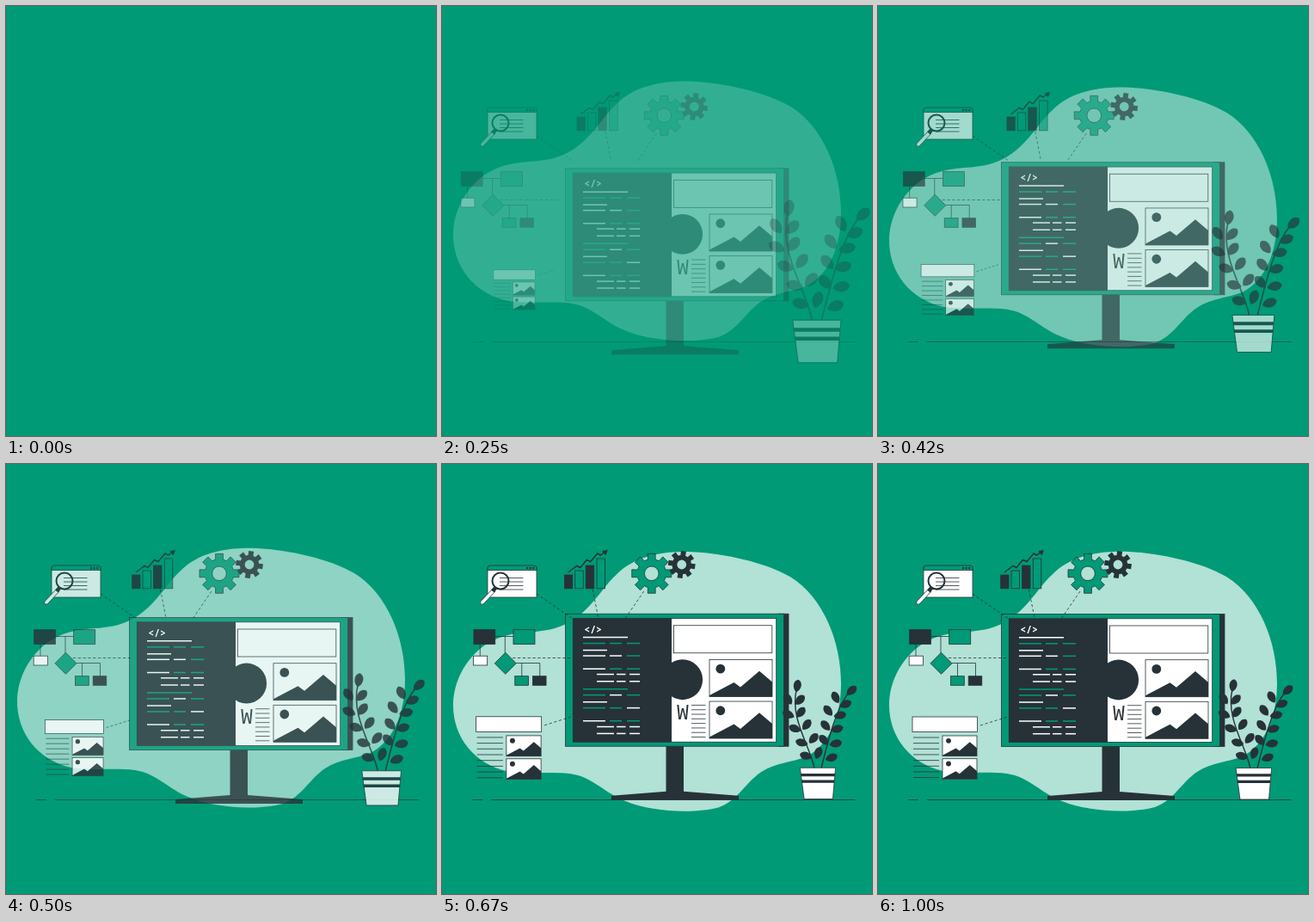
Write an HTML page that moves like this. It is 500x500 px and loops after 1040 ms.

```html
<!DOCTYPE html>
<html lang="en">
<head>
<meta charset="utf-8">
<title>Web development</title>
<style>
  html, body { margin: 0; width: 100%; height: 100%; overflow: hidden; background: #009a76; }
  svg { display: block; width: 100vw; height: 100vh; }
  .main { fill: #009a76; }
  .dark { fill: #263238; }
  .white { fill: #fff; }
  .edge { stroke: #263238; stroke-width: .8; }
  .line { fill: none; stroke: #263238; stroke-width: .8; }
  .dash { fill: none; stroke: #263238; stroke-width: .8; stroke-dasharray: 3.2 2.6; }
  text { font-family: "Noto Sans Mono", "DejaVu Sans Mono", monospace; }
</style>
</head>
<body>
<svg viewBox="0 0 500 500">
  <g id="blob">
    <path fill="#b2e1d6" d="M13 278C14 247 34 214 66 202C96 191 122 200 151 182C178 165 186 141 211 121C236 103 268 101 292 102C329 104 376 114 405 131C444 155 464 207 464 255C464 296 449 327 424 340C406 347 388 347 371 358C353 370 344 391 322 399C293 407 243 404 214 392C188 382 176 364 150 360C124 357 102 361 76 357C38 349 12 317 13 278Z"/>
  </g>

  <g id="ground">
    <path class="line" d="M35.500 390.500H47M57 390.500H480.500"/>
  </g>

  <g id="monitor">
    <path class="dark" d="M260.500 328H281V381L345 386V391H197V386L260.500 381Z"/>
    <rect class="dark edge" x="391" y="174.500" width="12" height="154"/>
    <rect class="main edge" x="143.500" y="174.500" width="254" height="154"/>
    <rect class="white edge" x="152.300" y="179.800" width="236.400" height="143.700"/>
    <rect class="dark" x="152" y="179.500" width="115" height="144.300"/>
    <circle class="dark" cx="279.700" cy="251" r="23.400"/>
    <text class="white" x="165.300" y="197" font-size="11.500" font-weight="600">&lt;/&gt;</text>
    <g id="code" stroke-width="1.500"></g>
    <rect class="white edge" x="269.500" y="188" width="114.300" height="32"/>
    <g id="photos"></g>
    <text class="dark" x="272.800" y="297.500" font-size="24">W</text>
    <path id="column" class="line"/>
  </g>

  <g id="search">
    <rect class="white edge" x="53" y="120" width="57" height="35"/>
    <path class="main edge" d="M53 123.500V121Q53 118 56 118H107Q110 118 110 121V123.500Z"/>
    <g class="dark"><circle cx="99" cy="121" r="1.200"/><circle cx="102.600" cy="121" r="1.200"/><circle cx="106.200" cy="121" r="1.200"/></g>
    <path class="line" d="M67 132.500H94.500M67 137H94.500M67 141.500H94.500M67 146H94.500"/>
    <circle cx="68" cy="136" r="9.500" fill="none" stroke="#263238" stroke-width="2"/>
    <path class="white edge" d="M58.500 145.500L61.800 148.300L48.500 162.500Q46.500 164 45 162.500Q44 161 45.300 159.500Z"/>
    <path class="dark" d="M61 142L64.300 144.700L60.800 149.500L57 146.500Z"/>
    <path class="dash" d="M110 151L152 180"/>
  </g>

  <g id="chart">
    <g class="edge">
      <rect class="dark" x="142.700" y="129" width="9.300" height="15.800"/>
      <rect class="main" x="155" y="124" width="9.500" height="20.800"/>
      <rect class="dark" x="167.500" y="118" width="9.500" height="26.800"/>
      <rect class="main" x="180.300" y="110" width="9.500" height="34.800"/>
    </g>
    <path fill="none" stroke="#263238" stroke-width="1.500" d="M147 126L157 118.500L161 120.500L168.500 111.500L173 113.500L181 104L184.500 106L190 102"/>
    <path class="dark" d="M193 100L190.500 106.500L186.500 101Z"/>
    <path class="dash" d="M175.500 146L182 179"/>
  </g>

  <g id="gears">
    <path id="bigGear" class="main edge" fill-rule="evenodd"/>
    <path id="smallGear" class="dark" fill-rule="evenodd"/>
    <path class="dash" d="M235 148L213 180"/>
  </g>

  <g id="flow">
    <path class="line" d="M61 200.500H83M73 200.500V220M44 209V224M86 231.500H113.500V247M92.500 231.500V247"/>
    <g class="edge">
      <rect class="dark" x="36.700" y="192.700" width="24.800" height="16.800"/>
      <rect class="main" x="82.700" y="192.700" width="25" height="16.800"/>
      <rect class="white" x="36.200" y="223.200" width="16.200" height="10.800"/>
      <path class="main" d="M73.500 219.200L86 231.800L73.500 244.300L61 231.800Z"/>
      <rect class="main" x="84.500" y="246.700" width="15.800" height="10.600"/>
      <rect class="dark" x="105.200" y="246.700" width="15.600" height="10.600"/>
    </g>
    <path class="dash" d="M82 225.500H151"/>
  </g>

  <g id="page">
    <rect class="white edge" x="40" y="294" width="75.500" height="17.500"/>
    <path id="rows" class="line"/>
    <g id="thumbs"></g>
    <path class="dash" d="M119 304L152 293.500"/>
  </g>

  <g id="plant">
    <path class="line" style="stroke-width:1.400" d="M433 354C428 328 404 296 412 262M441 354C447 330 458 282 474 265"/>
    <g id="leaves" class="dark"></g>
    <path class="white edge" d="M416.200 353.500H457.700L454.500 390H421Z"/>
    <path class="dark" d="M416.900 360.200H457.100L456.800 363.600H417.200ZM417.600 367.700H456.500L456.200 371H418Z"/>
  </g>
</svg>

<script>
const $ = id => document.getElementById(id);
const MAIN = '#009a76', WHITE = '#fff';

// Code lines: y, layout, one colour letter per dash
const layouts = {
  long: [[164, 216]],
  short: [[164, 192]],
  three: [[164, 190], [195, 209], [215, 230]],
  inner: [[180, 200], [203, 213.5], [218, 230]]
};
const codeRows = [
  [201.8, 'long', 'w'], [208.8, 'three', 'ggg'], [216.8, 'short', 'w'], [223.3, 'three', 'wwg'],
  [238.5, 'three', 'wgg'], [244.8, 'inner', 'www'], [253, 'inner', 'www'],
  [262, 'long', 'g'], [268.9, 'three', 'gwg'], [277, 'short', 'w'], [283.9, 'three', 'ggw'],
  [299, 'three', 'wgg'], [305.8, 'inner', 'www'], [313.7, 'inner', 'www']
];
$('code').innerHTML = codeRows.map(([y, kind, tones]) =>
  layouts[kind].map(([a, b], i) =>
    `<path d="M${a} ${y}H${b}" stroke="${tones[i] === 'w' ? WHITE : MAIN}"/>`).join('')).join('');

// Picture placeholder with a sun and mountains, drawn on a 73 x 43 box
const picture = (x, y, s) => `<g transform="translate(${x} ${y}) scale(${s})">
  <rect class="white edge" width="73" height="43" style="stroke-width:${0.8 / s}"/>
  <circle class="dark" cx="12.800" cy="10.700" r="5.400"/>
  <path class="dark" d="M0 43V41.500L28.500 26.500L36 32L58 13.300L73 26V43Z"/></g>`;
$('photos').innerHTML = picture(311, 227.7, 1) + picture(311, 276.3, 1);
$('thumbs').innerHTML = picture(75, 316, 0.548) + picture(75, 342.7, 0.548);

const ruled = (n, x1, x2, y, gap) =>
  Array.from({ length: n }, (_, i) => `M${x1} ${y + i * gap}H${x2}`).join('');
$('column').setAttribute('d', ruled(8, 290, 306.5, 280.7, 5.3));
$('rows').setAttribute('d', ruled(8, 41, 71, 318, 6.65));

function gear(cx, cy, tip, root, hole, turn) {
  const at = (r, deg) => {
    const a = (deg + turn) * Math.PI / 180;
    return `${(cx + r * Math.cos(a)).toFixed(2)} ${(cy + r * Math.sin(a)).toFixed(2)}`;
  };
  let d = 'M' + at(root, -15);
  for (let a = 0; a < 360; a += 45) {
    d += `L${at(tip, a - 11)}L${at(tip, a + 11)}L${at(root, a + 15)}`;
    d += `A${root} ${root} 0 0 1 ${at(root, a + 30)}`;
  }
  return `${d}ZM${cx - hole} ${cy}a${hole} ${hole} 0 1 0 ${2 * hole} 0a${hole} ${hole} 0 1 0 ${-2 * hole} 0Z`;
}
$('bigGear').setAttribute('d', gear(244, 127.3, 23.4, 16.8, 8.3, 0));
$('smallGear').setAttribute('d', gear(279, 117, 16, 11.2, 5.4, 8));

// Leaves: centre x, centre y, angle
const leaves = [
  [413, 257.500, -80], [416, 274, -45], [402, 273, -125], [417, 288.500, -50], [402.500, 291, -155],
  [424, 303, -52], [410, 307.500, -160], [432, 319, -48], [418, 324, -165], [437.500, 336, -70], [423, 339.500, -165],
  [476.500, 263, -42], [469.500, 279, -22], [457.800, 271, -118], [463, 292, -12], [449, 286.500, -128],
  [459.500, 308, -15], [446, 304, -132], [458, 325, -12], [444, 321, -132], [453, 341.500, -20]
];
$('leaves').innerHTML = leaves.map(([x, y, a]) =>
  `<path transform="translate(${x} ${y}) rotate(${a})" d="M-7.500 0C-4 -5.500 5 -6.500 7.300 0C5 6.500 -4 5.500 -7.500 0Z"/>`).join('');

// Overshooting cubic-bezier(.36, -.01, .5, 1.38)
function ease(x) {
  if (x >= 1) return 1;
  const curve = (s, a, b) => 3 * (1 - s) ** 2 * s * a + 3 * (1 - s) * s * s * b + s ** 3;
  let lo = 0, hi = 1;
  for (let i = 0; i < 24; i++) {
    const mid = (lo + hi) / 2;
    if (curve(mid, 0.36, 0.5) < x) lo = mid; else hi = mid;
  }
  return curve(lo, -0.01, 1.38);
}

const slide = (dx, dy) => p => `translate(${dx * (1 - p)} ${dy * (1 - p)})`;
const zoom = (cx, cy, from) => p =>
  `translate(${cx} ${cy}) scale(${from + (1 - from) * p}) translate(${-cx} ${-cy})`;
const still = slide(0, 0);
const moves = {
  blob: slide(0, -20), ground: still, monitor: slide(0, 20), search: still,
  chart: slide(20, 0), gears: slide(20, 0), flow: slide(-20, 0),
  page: zoom(95.5, 330, 0.5), plant: zoom(440, 321, 1.5)
};

const LOOP = 1040, RATE = 24, LEAD = 0.03;
const start = performance.now();
function draw() {
  const t = (performance.now() - start) % LOOP;
  const step = Math.floor((t + 4) * RATE / 1000);
  const p = step < 2 ? 0 : ease(step / RATE + LEAD);
  for (const id in moves) {
    const part = $(id);
    part.setAttribute('transform', moves[id](p));
    part.setAttribute('opacity', Math.min(1, Math.max(0, p)));
  }
  requestAnimationFrame(draw);
}
draw();
</script>
</body>
</html>
```
